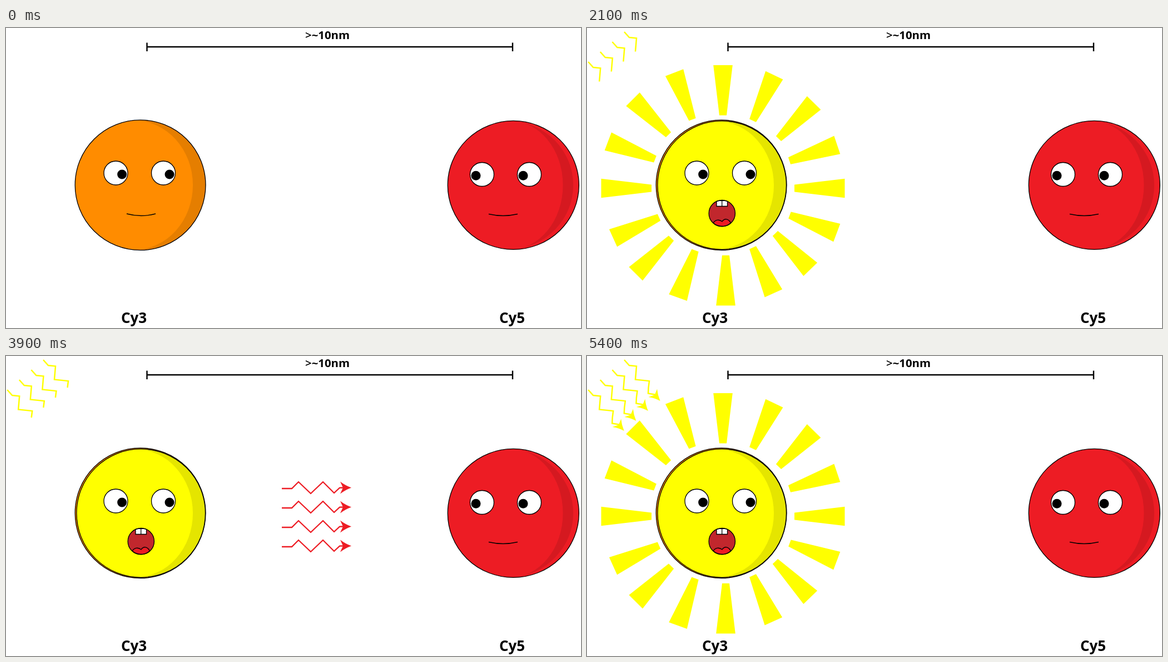
These frames come from a looping animation (1034x541 px, 5.7 s). An HTML page:

```html
<!DOCTYPE html>
<html lang="en">
<head>
<meta charset="utf-8">
<title>Dye distance</title>
<style>
  html, body { margin: 0; width: 100%; height: 100%; overflow: hidden; background: #fff; }
  svg { display: block; width: 1034px; height: 541px; }
  text { font-family: "Open Sans", "Noto Sans", sans-serif; font-weight: 700; font-size: 26px; }
  .ink { stroke: #000; stroke-width: 1.3; }
  .line { fill: none; stroke: #000; stroke-width: 1.3; }
  .shade { fill: #000; fill-opacity: .1; }
  .eye { fill: #fff; stroke: #000; stroke-width: 1.3; }
  .zig { fill: none; stroke-miterlimit: 8; }
</style>
</head>
<body>
<svg viewBox="0 0 1034 541">
  <defs>
    <path id="head" d="M0 0Q-11 -4 -20 -11L-15 0L-20 11Q-11 4 0 0Z"/>
    <path id="ray" d="M-6.5 0L-17.3 -90.5H17.3L6.5 0Z"/>
    <g id="beam">
      <polyline id="beamLine" class="zig" stroke="#ff0" stroke-width="2.5"/>
      <use id="beamHead" href="#head" fill="#ff0" transform="translate(131.5 81) rotate(47) scale(.97)"/>
    </g>
    <g id="wave">
      <polyline id="waveLine" class="zig" stroke="#ed1c24" stroke-width="2.3"/>
      <use id="waveHead" href="#head" fill="#ed1c24" transform="translate(621 237.5)"/>
    </g>
  </defs>

  <path d="M253.5 34H911M253.5 26.5V42M911 26.5V42" fill="none" stroke="#000" stroke-width="2.4"/>
  <text x="538" y="20" style="font-size:20.4px"><tspan font-weight="600">&gt;</tspan>~10nm</text>
  <text x="207" y="532">Cy3</text>
  <text x="887" y="532">Cy5</text>

  <g id="beams"></g>
  <g id="waves"></g>
  <g id="rays" fill="#ff0"></g>

  <!-- donor -->
  <circle class="ink" cx="241.6" cy="283.3" r="117.4" fill="#ff8c00"/>
  <g id="calm">
    <path class="shade" d="M230 166.5A117.4 117.4 0 1 1 230 400.1A106 116.8 0 0 0 230 166.5Z"/>
    <path class="line" d="M217 335Q243 342 269 335"/>
  </g>
  <g id="excited">
    <circle class="ink" cx="242.7" cy="283.5" r="115.8" fill="#ff0"/>
    <path class="shade" d="M233 168.1A115.8 115.8 0 1 1 233 398.9A103 115.4 0 0 0 233 168.1Z"/>
    <circle cx="242.8" cy="334.2" r="23.7" fill="#c1272d"/>
    <path class="ink" fill="#ed1c24" d="M227 351.5C231 345 238 345 243 349C247 343 254 343 258.5 351.5A23.7 23.7 0 0 1 227 351.5Z"/>
    <path class="ink" fill="#fff" d="M233 312.5Q243 309.5 252.5 312.5V321.5H233ZM242.7 311V321.5"/>
    <circle class="line" cx="242.8" cy="334.2" r="23.7"/>
  </g>
  <circle class="eye" cx="197.5" cy="261.5" r="21.5"/>
  <circle class="eye" cx="283" cy="261.5" r="21.5"/>
  <circle cx="208.6" cy="264" r="8.5"/>
  <circle cx="294" cy="264" r="8.5"/>

  <!-- acceptor -->
  <ellipse class="ink" cx="912.3" cy="283.4" rx="118" ry="116" fill="#ed1c24"/>
  <path class="shade" d="M907 167.5A118 116 0 0 1 907 399.3A94.5 115.9 0 0 0 907 167.5Z"/>
  <circle class="eye" cx="856" cy="264" r="21.5"/>
  <circle class="eye" cx="941" cy="264" r="21.5"/>
  <circle cx="845" cy="266.3" r="8.5"/>
  <circle cx="930" cy="266.3" r="8.5"/>
  <path class="line" d="M868 335.5Q894 341.5 920 335.5"/>
</svg>
<script>
  const $ = id => document.getElementById(id);
  const STEP = 300;

  // One digit per step: how far each arrow has grown, and whether the rays shine.
  const beamStage = "0123401234012341234";
  const waveStage = "0000000000012301230";
  const raysOn    = "0000010101101010101";
  const firstExcited = 5;

  const beamPoints = [[67, 7], [76, 17], [89, 18.3], [87, 42.5], [112, 45], [110.5, 57], [110, 67.5], [122, 69.5]];
  const wavePoints = [[496, 239], [514, 239], [526, 227], [548, 248], [570, 227], [590, 247], [600, 237.7], [607, 237.5]];
  const beamCounts = [0, 3, 4, 6, 8];
  const waveCounts = [0, 3, 5, 8];

  // Inner end x, y and clockwise angle from straight up.
  const rays = [
    [244.5, 157.5, 0], [298, 167, 25.4], [344.5, 199.5, 44.6], [364, 239.5, 71.5],
    [373, 289, 90], [364.5, 337.5, 110.5], [338.5, 370.5, 135.7], [298, 396, 155.6],
    [249.5, 410, 180], [194.5, 401, 200], [151.5, 379, 224.8], [129.5, 341.5, 245.7],
    [116, 289, 270], [122.5, 236.5, 290.7], [146.5, 192.5, 315], [189.5, 165, 339]
  ];

  function place(parent, href, transform) {
    const use = document.createElementNS("http://www.w3.org/2000/svg", "use");
    use.setAttribute("href", href);
    use.setAttribute("transform", transform);
    $(parent).append(use);
  }

  for (let i = 0; i < 4; i++) {
    place("beams", "#beam", `translate(${-21.6 * i} ${18 * i})`);
    place("waves", "#wave", `translate(0 ${35 * i})`);
  }
  for (const [x, y, angle] of rays) place("rays", "#ray", `translate(${x} ${y}) rotate(${angle})`);

  function show(id, on) {
    $(id).style.display = on ? "" : "none";
  }

  function grow(name, points, counts, stage) {
    $(name + "Line").setAttribute("points", points.slice(0, counts[stage]).join(" "));
    show(name + "Head", +stage === counts.length - 1);
  }

  function draw(step) {
    grow("beam", beamPoints, beamCounts, beamStage[step]);
    grow("wave", wavePoints, waveCounts, waveStage[step]);
    show("rays", raysOn[step] === "1");
    show("excited", step >= firstExcited);
    show("calm", step < firstExcited);
  }

  let start, last = 0;
  function tick(now) {
    start ??= now;
    const step = Math.floor((now - start) / STEP) % beamStage.length;
    if (step !== last) draw(last = step);
    requestAnimationFrame(tick);
  }
  draw(0);
  requestAnimationFrame(tick);
</script>
</body>
</html>
```
